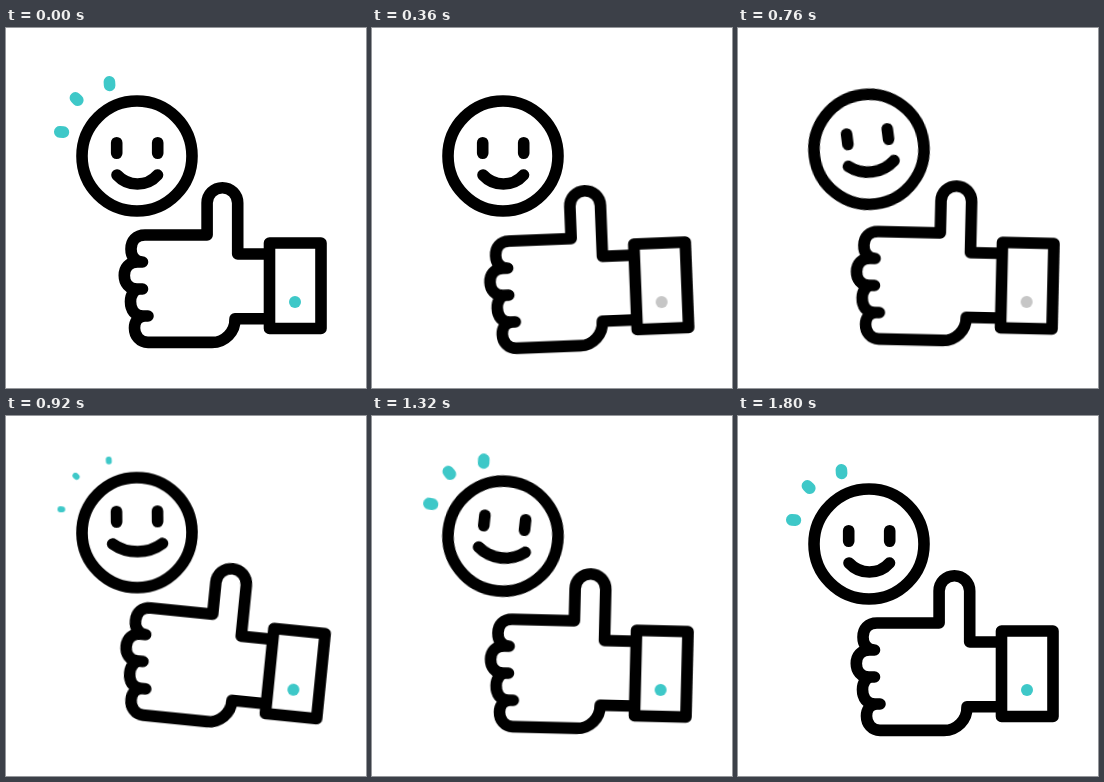
These frames come from a looping animation (360x360 px, 1920 ms). An HTML page:

```html
<!DOCTYPE html>
<html lang="en">
<head>
<meta charset="utf-8">
<title>Thumbs up</title>
<style>
  html, body { margin: 0; width: 100%; height: 100%; overflow: hidden; background: #fff; }
  svg { display: block; width: 100vw; height: 100vh; }
  .ink { fill: none; stroke: #000; stroke-width: 11.6; stroke-linecap: round; stroke-linejoin: round; }
  .hand, .lift, .tilt, .eyes, .mouth, .sparks path {
    animation: 1920ms cubic-bezier(.37, 0, .63, 1) infinite;
  }
  .hand { transform-origin: 291px 258px; animation-name: wave; }
  .lift { animation-name: lift; }
  .tilt { transform-origin: 131px 128px; animation-name: tilt; }
  .eyes { animation-name: look; }
  .mouth { d: path("M111 147C122 159 141 159 151.5 147"); animation-name: smile; }
  .sparks { stroke: #3ec8c8; }
  .sparks path { transform-box: fill-box; transform-origin: center; animation-name: spark; }
  .button { fill: #3ec8c8; animation: button 1920ms step-end infinite; }

  @keyframes wave {
    0%, 4.167% { transform: rotate(0deg); }
    27.083% { transform: rotate(-3.2deg); }
    54.167% { transform: rotate(7deg); }
    75%, 100% { transform: rotate(0deg); }
  }
  @keyframes lift {
    0%, 27.083%, 85.417%, 100% { transform: translateY(0); }
    50%, 58.333% { transform: translateY(-11.6px); }
  }
  @keyframes tilt {
    0%, 27.083%, 50%, 58.333%, 83.333%, 100% { transform: rotate(0deg); }
    38.542% { transform: rotate(-7.5deg); }
    69.792% { transform: rotate(6.5deg); }
  }
  @keyframes look {
    0%, 27.083%, 85.417%, 100% { transform: translateY(0); }
    50%, 58.333% { transform: translateY(-8.2px); }
  }
  @keyframes smile {
    0%, 27.083%, 85.417%, 100% { d: path("M111 147C122 159 141 159 151.5 147"); }
    50%, 58.333% { d: path("M106.5 139C121 149.5 142 149.5 156.5 139"); }
  }
  @keyframes spark {
    0%, 6.25%, 52.083%, 100% { transform: scale(1); }
    14.583%, 43.75% { transform: scale(0); }
  }
  @keyframes button {
    0%, 43.75% { fill: #3ec8c8; }
    14.583% { fill: #c6c6c6; }
  }
</style>
</head>
<body>
<svg viewBox="0 0 360 360">
  <g class="lift">
    <g class="tilt ink">
      <g class="sparks">
        <path d="M103.4 53.8L103.6 57.4"/>
        <path d="M69.4 69.9L71.8 72.2"/>
        <path d="M53.8 103.9L57.4 104.1"/>
      </g>
      <circle cx="131" cy="128" r="55"/>
      <path class="eyes" d="M110.7 114.7V125.3M151.7 114.7V125.3"/>
      <path class="mouth"/>
    </g>
  </g>
  <g class="hand ink">
    <path d="M263 226H231.7V175A15.3 15.3 0 0 0 201.1 175V207H139C130 207 125 213 125 221C125 229 129 234 136.5 234H131.5C123 234 118.3 240 118.3 247.5C118.3 255 123 261 131 261H136.5H134C128 261 124.5 267 124.5 273.5C124.5 282 129 288 137 288H142H139C132 288 128.5 294 128.5 300C128.5 308 134 314.4 142 314.4H206A23 23 0 0 0 229 290.7H263"/>
    <path d="M263.5 215H315V300.5H263.5Z"/>
    <circle class="button" cx="289" cy="274" r="6" stroke="none"/>
  </g>
</svg>
</body>
</html>
```
